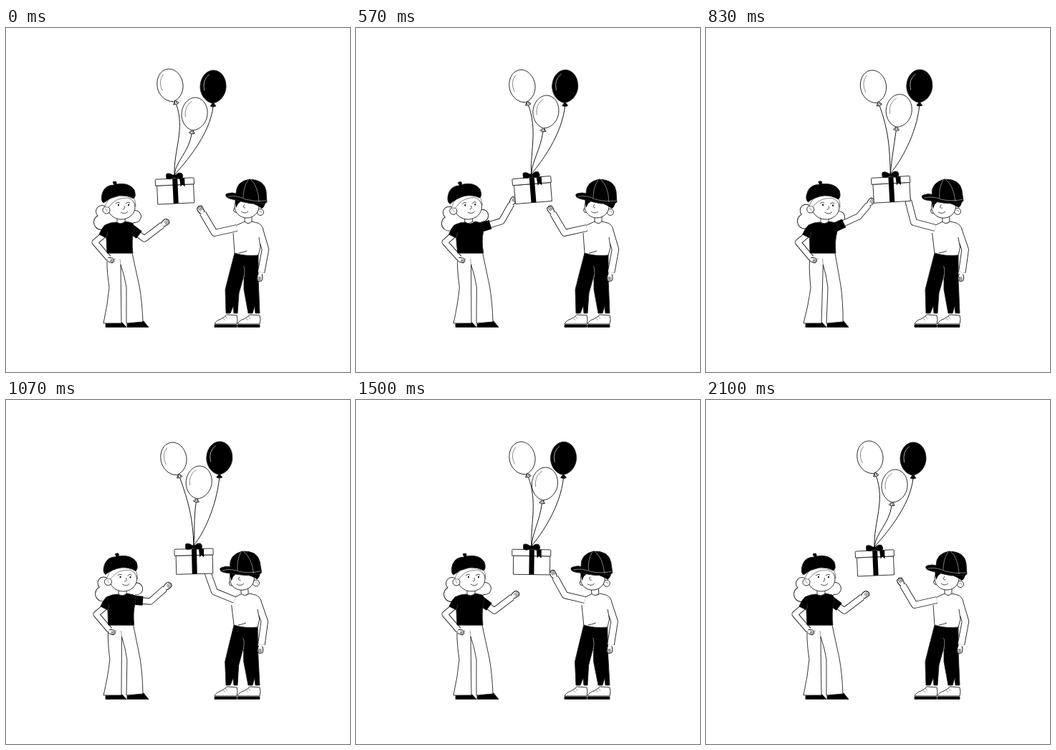
An HTML page with a canvas that plays this animation: 480 px wide and 480 px high, repeating every 2.13 s.

```html
<!DOCTYPE html>
<html lang="en">
<head>
<meta charset="utf-8">
<title>Balloon gift</title>
<style>
html, body { margin: 0; width: 100%; height: 100%; overflow: hidden; background: #fff; }
canvas { display: block; width: 480px; height: 480px; }
</style>
</head>
<body>
<canvas id="stage"></canvas>
<script>
const LOOP = 2130;
const INK = '#000', LINE = '#222', SOFT = '#777', PALE = '#ccc', WHITE = '#fff';

const canvas = document.getElementById('stage');
const ctx = canvas.getContext('2d');
const ratio = window.devicePixelRatio || 1;
canvas.width = canvas.height = 480 * ratio;

// Motion

const cycle = (t, peak) => Math.cos((t - peak) / LOOP * Math.PI * 2);
const swell = (t, peak) => (1 + cycle(t, peak)) / 2;

function ease(t, from, to) {
  const u = Math.min(1, Math.max(0, (t - from) / (to - from)));
  return u * u * (3 - 2 * u);
}

const pulse = (t, up, top, hold, down) => ease(t, up, top) - ease(t, hold, down);

// Goes from rest to touch with lift, then from touch to push with lean
const blend = ({ rest, touch, push }, { lift, lean }) =>
  rest.map((r, i) => r + lift * (touch[i] - r) + lean * (push[i] - touch[i]));

const GIRL_ARM = {
  elbow: { rest: [193, 294], touch: [201, 271], push: [213, 263] },
  hand: { rest: [222, 272], touch: [217, 241], push: [230, 243] }
};
const BOY_ARM = {
  elbow: { rest: [291, 286], touch: [290, 271], push: [292, 263] },
  hand: { rest: [272, 254], touch: [281, 236], push: [278, 236] }
};

// Drawing helpers

function shape(d, fill, stroke = LINE, width = 0.9) {
  const p = typeof d === 'string' ? new Path2D(d) : d;
  if (fill) { ctx.fillStyle = fill; ctx.fill(p); }
  if (stroke) { ctx.strokeStyle = stroke; ctx.lineWidth = width; ctx.stroke(p); }
}

const line = (d, color = LINE, width = 0.9) => shape(d, null, color, width);

function oval(x, y, rx, ry = rx, fill = WHITE, stroke = LINE) {
  const p = new Path2D();
  p.ellipse(x, y, rx, ry, 0, 0, Math.PI * 2);
  shape(p, fill, stroke);
}

function group(x, y, degrees, draw) {
  ctx.save();
  ctx.translate(x, y);
  ctx.rotate(degrees * Math.PI / 180);
  draw();
  ctx.restore();
}

const turn = (x, y, degrees, dx, draw) =>
  group(x + dx, y, degrees, () => { ctx.translate(-x, -y); draw(); });

// Shifts by base at height y0 and by base + extra at height y1
function slant(base, extra, y0, y1, draw) {
  const k = extra / (y1 - y0);
  ctx.save();
  ctx.transform(1, 0, k, 1, base - k * y0, 0);
  draw();
  ctx.restore();
}

function limb(points, width) {
  const d = 'M' + points.map(p => p.join(' ')).join('L');
  line(d, LINE, width + 0.9);
  line(d, WHITE, width - 0.9);
}

function hand(x, y, degrees, scale = 0.85) {
  group(x, y, degrees, () => {
    ctx.scale(scale, scale);
    shape('M-3.5 6Q-6 0-4.7-4Q-4-7-2-6Q0-8.5 2-6.5Q5-6.5 4.7-2Q4.5 3 3 6', WHITE, INK, 1.1);
    line('M-2-5.5L-1.5 1M.4-6.5L.6 1M2.8-6L2.5 1', LINE, 0.9);
  });
}

function reach(shoulder, elbow, tip, width) {
  const dx = tip[0] - elbow[0], dy = tip[1] - elbow[1];
  const k = 5 / Math.hypot(dx, dy);
  limb([shoulder, elbow, [tip[0] - dx * k, tip[1] - dy * k]], width);
  hand(...tip, Math.atan2(dx, -dy) * 180 / Math.PI);
}

// Gift and balloons

function balloon(x, y, tilt, drop, fill) {
  group(x, y, drop, () =>
    shape('M-1 23L-4 27Q0 29 4 27L1 23ZM-1 24L-1.5 27M1 24L1.5 27', fill));
  group(x, y, tilt, () => {
    shape('M0 23C-12 21-18 9-18 0C-18-13-10-23 0-23C10-23 18-13 18 0C18 9 12 21 0 23Z', fill);
    line('M-6-17Q-16-9-12 6', fill === INK ? PALE : SOFT, 0.8);
  });
}

function string(x, y, drop, bend, end, pull) {
  const a = drop * Math.PI / 180;
  const sx = x - Math.sin(a) * 27, sy = y + Math.cos(a) * 27;
  const p = new Path2D();
  p.moveTo(sx, sy);
  p.bezierCurveTo(sx + bend[0], sy + bend[1], end[0] + pull[0], end[1] + pull[1], ...end);
  shape(p, null, INK);
}

function drawGift(t) {
  const drift = swell(t, 1040), tug = swell(t, 950) ** 4;
  const left = [229 + 5 * drift, 80 + 2 * drift];
  const mid = [263 + 7 * tug, 120 - 5 * drift];
  const right = [289 + 10 * tug, 82 - drift];
  const box = [235 + 27 * drift ** 2, 207 - 2.3 * drift];
  const tilt = -2 - 2.7 * cycle(t, 450);
  const knot = [box[0], box[1] - 2];

  string(...left, -18, [13, 36], knot, [-1, -36]);
  string(...mid, 8, [-4, 27], knot, [2, -20]);
  string(...right, 0, [-4, 40], knot, [14, -16]);
  balloon(...left, -11, -18, WHITE);
  balloon(...right, 3, 0, INK);
  balloon(...mid, 8, 8, WHITE);
  return () => group(...box, tilt, drawBox);
}

function drawBox() {
  shape('M-25 12H26V38H-25Z', WHITE);
  shape('M-26 3H26Q27 3 27 4V12H-27V4Q-27 3-26 3Z', WHITE);
  shape('M-3 3H4V38H-3Z', INK, null);
  shape('M7 3H14V15L10.5 12L8 15Z', INK, null);
  shape('M0 0Q-6-6-11-4Q-12 0-11 3Q-5 5 0 1Q5 5 11 3Q13-1 10-4Q5-6 0 0Z', INK);
  oval(0, 0, 3, 2.5, INK, null);
}

// Girl

function girlHair() {
  const hair = new Path2D();
  for (const [x, y, r] of [[134, 256, 8], [133, 271, 10], [145, 270, 12], [180, 263, 8], [173, 264, 9]]) {
    hair.moveTo(x + r, y);
    hair.arc(x, y, r, 0, Math.PI * 2);
  }
  shape(hair, null, LINE, 1.8);
  shape(hair, WHITE, null);
}

function girlHead() {
  girlHair();
  shape('M155 260V271Q160 275 166 270V260', WHITE);
  oval(161, 250, 19, 17);
  oval(140, 254, 5);
  line('M138 252Q141 252 141 256', SOFT, 0.7);
  shape('M138 250Q140 240 150 234Q163 228 174 232Q181 238 181 249Q179 240 170 237Q157 237 150 243Q145 248 143 250Z', WHITE, SOFT);
  for (const x of [157, 171]) {
    oval(x, 247, 1, 1.3, INK, null);
    line(`M${x - 4} 245Q${x - 1} 242 ${x + 2} 244`, LINE, 0.8);
  }
  line('M165 248Q167 253 163 253M160 257Q166 261 170 256', LINE, 0.8);
  shape('M136 244Q131 240 135 229Q139 219 151 219L149 215Q153 213 154 215L154 218Q172 215 179 226Q182 235 178 238Q169 233 158 234Q146 236 136 244Z', INK);
}

function drawGirl(t) {
  const move = { lift: pulse(t, 0, 310, 860, 1240), lean: pulse(t, 470, 850, 860, 1240) };
  const { lift, lean } = move;
  const hip = 4 * lean, tip = 3 * lean - 2 * lift;

  shape('M139 412.5L162 411L168 417.5H139ZM169 412.5L192 409L199 417.5H169Z', INK);
  slant(0, hip, 413, 315, () => {
    shape('M142 314Q139 328 144 362Q142 385 136 412H161L160 330Q166 348 168 362V412L191 410Q190 382 186 360L176 314Z', WHITE);
    line('M160 330L159 322M142 318Q148 324 153 322', SOFT, 0.7);
  });
  turn(160, 270, 8 * lean - 5 * lift, 10 * lean - 5 * lift, girlHead);

  const shoulder = [173 + hip + tip, 279];
  const elbow = blend(GIRL_ARM.elbow, move);
  reach(shoulder, elbow, blend(GIRL_ARM.hand, move), 8.5);

  const dx = elbow[0] - shoulder[0], dy = elbow[1] - shoulder[1];
  const k = 16 / Math.hypot(dx, dy);
  line(`M${shoulder.join(' ')}l${dx * k} ${dy * k}`, INK, 13);

  slant(hip, tip, 315, 278, () => {
    limb([[137, 288], [124, 299], [143, 321]], 8);
    hand(146, 324, 105, 0.7);
    shape('M154 271Q160 276 167 270L176 272Q180 275 178 285Q175 296 177 314H141L140 293L130 288Q133 280 138 275Q146 271 154 271Z', INK);
    line('M140 293L142 285', SOFT, 0.5);
  });
}

// Boy

function boyHead() {
  shape('M333 258V270Q338 275 343 270V258', WHITE);
  oval(355, 257, 4.5);
  oval(321, 254, 3.5);
  oval(336, 249, 17, 16);
  line('M353 256Q356 254 357 258', SOFT, 0.7);
  line('M333 246Q329 251 334 251M328 256Q333 260 338 256', LINE, 0.8);
  shape('M319 238L328 242L324 245L321 251Z', INK, null);
  shape('M344 243L362 244Q361 249 357 252Q350 247 346 246Z', INK, null);
  shape('M321 231Q321 214 340 211Q361 212 363 228L364 243Q360 247 355 245H342Q330 243 322 240Q312 239 308 236Q305 232 309 231Q316 229 321 231Z', INK);
  line('M338 212Q331 222 331 237M341 211Q352 220 353 243M310 235Q322 233 334 239Q348 243 363 241', PALE, 0.6);
}

function shoe() {
  shape('M0 413Q2 408 9 406Q15 403 17 400L31 401Q33 407 31 413Z', WHITE);
  line('M12 405L15 408M15 402L18 406', SOFT, 0.7);
  shape('M0 414H31V417.5H0Z', INK);
}

function drawBoy(t) {
  const move = { lift: pulse(t, 560, 820, 1300, 1760), lean: pulse(t, 900, 1270, 1300, 1760) };
  const { lift, lean } = move;
  const hip = -2 * lean, tip = -2 * lift;

  for (const x of [291, 323]) group(x, 0, 0, shoe);
  slant(0, hip, 398, 315, () => {
    shape('M319 314L311 345L306 365L307 398H313L317 388L318 398H323L325 370L332 345L332 365L338 398H344L347 388L348 398H354L352 350V316Z', INK);
    line('M331 332Q334 334 332 348', PALE, 0.6);
  });
  slant(hip, tip, 315, 275, () => {
    hand(354, 348, 185, 0.8);
    limb([[354, 282], [362, 309], [356, 341]], 9.5);
    shape('M319 314L317 286Q318 277 324 274L333 270Q338 274 343 270L351 272Q357 274 359 279L354 285L355 300L352 317Q334 319 319 314Z', WHITE, null);
    line('M317 286L319 314Q334 319 352 317L355 306L353 292M320 276L333 270Q338 274 343 270L351 272Q357 274 359 281M325 314Q331 313 336 311');
  });
  reach([322 + hip + tip, 279], blend(BOY_ARM.elbow, move), blend(BOY_ARM.hand, move), 9);
  turn(338, 270, -4 * lift - 3 * lean, -3 * lift - 4 * lean, boyHead);
}

function draw(t) {
  ctx.setTransform(ratio, 0, 0, ratio, 0, 0);
  ctx.lineJoin = 'round';
  ctx.fillStyle = WHITE;
  ctx.fillRect(0, 0, 480, 480);
  const box = drawGift(t);
  drawGirl(t);
  drawBoy(t);
  box();
}

const start = performance.now();
function tick() {
  draw((performance.now() - start) % LOOP);
  requestAnimationFrame(tick);
}
tick();
</script>
</body>
</html>
```
